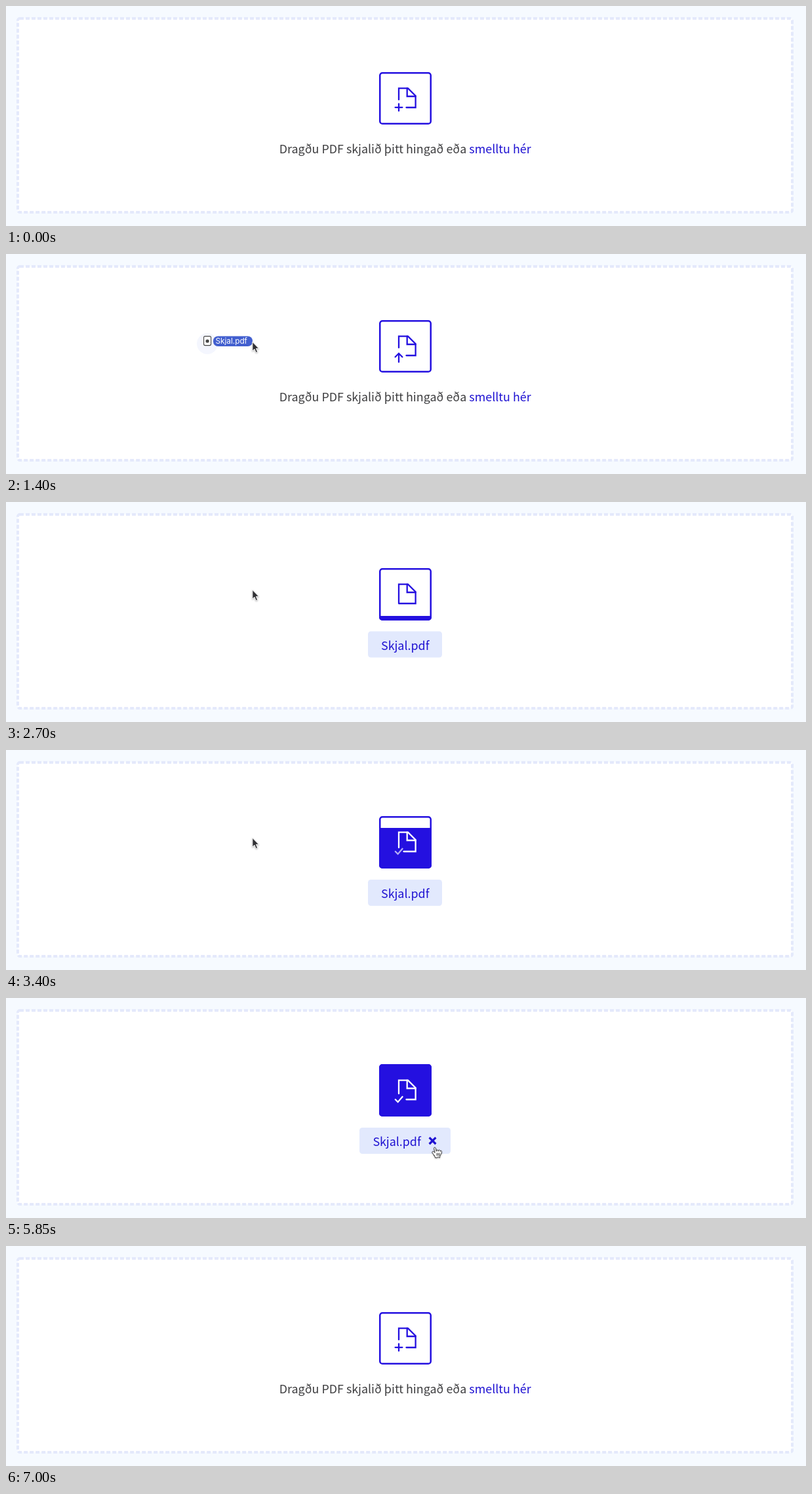
Animation of 1220x336 px, one loop 7.7 s. Source, as an HTML page:

```html
<!DOCTYPE html>
<html lang="is">
<head>
<meta charset="utf-8">
<title>PDF</title>
<style>
html, body { margin: 0; width: 1220px; height: 336px; overflow: hidden; background: #f6faff; }
svg { display: block; color: #2410e0; }
.copy { font: 17.9px "Noto Sans CJK JP", "Noto Sans CJK SC", "Noto Sans CJK", "Noto Sans", sans-serif; text-anchor: middle; }
.line { fill: none; stroke: currentColor; stroke-width: 2.3; stroke-linecap: round; }
.cursor { filter: drop-shadow(0 1px 1px rgba(0, 0, 0, .3)); }
</style>
</head>
<body>
<svg width="1220" height="336" viewBox="0 0 1220 336">
  <defs>
    <clipPath id="level"><rect id="levelRect" x="569" width="80" height="80"/></clipPath>
    <g id="icon" class="line">
      <path id="sheet"/>
      <path d="M611.7 125.6V138H624.6"/>
      <path id="plus" d="M593.6 154.8H604.4M599 149.4V160.2"/>
      <path id="arrow" d="M599 152V165M593.6 157.2L599 151.8L604.4 157.2"/>
      <path id="check" d="M593.8 155L597.6 158.9L604.6 150.8"/>
    </g>
  </defs>

  <rect x="18" y="19" width="1181" height="296" rx="3" fill="#fff"/>
  <rect x="18" y="19" width="1181" height="296" rx="3" fill="none" stroke="#e4e9fb" stroke-width="4" stroke-dasharray="6 3"/>

  <rect x="570.25" y="102.25" width="77.5" height="77.5" rx="3.8" fill="#fff" stroke="#2410e0" stroke-width="2.5"/>
  <use href="#icon"/>
  <g id="fill" clip-path="url(#level)">
    <rect x="569" y="101" width="80" height="80" rx="5" fill="#2410e0"/>
    <use href="#icon" color="#fff"/>
  </g>

  <text id="prompt" class="copy" x="608.7" y="225" fill="#3d3d3f">Dragðu PDF skjalið þitt hingað eða <tspan fill="#1f12d2">smelltu hér</tspan></text>

  <g id="pill">
    <rect id="pillBox" y="198" height="40" rx="4.5" fill="#e2e9fd"/>
    <text id="pillText" class="copy" y="226" fill="#1f12d2">Skjal.pdf</text>
    <path id="cross" d="M645.6 213.2L655.4 223M655.4 213.2L645.6 223" stroke="#1f12d2" stroke-width="3.2"/>
  </g>

  <g id="ghost">
    <circle cx="307" cy="137" r="16" fill="#f4f6fe"/>
    <rect x="301.6" y="125.6" width="11" height="14" rx="2" fill="#fff" stroke="#444" stroke-width="1.1"/>
    <circle cx="307.1" cy="133" r="2.6" fill="#444"/>
    <rect x="316" y="125.5" width="60" height="15.5" rx="7.2" fill="#425fcf"/>
    <text x="319.4" y="137.4" fill="#fff" style="font:11.8px Inter,sans-serif">Skjal.pdf</text>
  </g>
  <path id="pointer" class="cursor" d="M375.8 134.2V148.2L378.9 145.2L381.2 150.6L383.7 149.5L381.4 144.3H385.6Z" fill="#303034" stroke="#fff" stroke-width="1"/>
  <g id="hand" class="cursor" stroke="#222" stroke-width=".9" stroke-linejoin="round" stroke-linecap="round">
    <path fill="#fff" d="M11.3 20.4C10.6 19.2 9.2 17.3 8.6 16.5C8 15.2 9.2 14.2 10.2 14.5C11.2 14.8 11.9 15.9 12.6 16.6C12.4 14.6 11.8 13 11.3 10.7C11 9.3 11.2 8.4 12.2 8.4C13.2 8.4 13.6 9.2 13.9 10.1C14.3 11.4 14.5 12.9 14.8 14.4C14.6 12.8 15 12.2 15.9 12.2C17.1 12.1 17.5 13.1 17.6 14.4C17.7 13 18 12.4 19.1 12.3C20.3 12.3 20.6 13.3 20.7 14.6C20.9 13.6 21.5 13.3 22 13.4C22.9 13.6 22.9 14.6 22.9 15.5C22.9 18 21.3 19.4 20.4 21C19.9 22 20 22.7 20.1 23.9C18.7 24.2 18.4 23.8 18 23C17.6 22.4 17.6 22.5 17.2 23C16.7 24 16.3 24.1 15.5 24.1H13C13.1 22.5 12 22 11.3 20.4Z"/>
    <path fill="none" d="M15.6 17.3V20.7M17.6 17.3V20.7M19.6 17.3V20.7"/>
  </g>
</svg>
<script>
const LOOP = 7700, STEP = 50;
const el = id => document.getElementById(id);
const set = (id, attrs) => { for (const k in attrs) el(id).setAttribute(k, attrs[k]); };
const shift = (x, y) => `translate(${x} ${y})`;
const ramp = (t, from, to) => Math.min(1, Math.max(0, (t - from) / (to - from)));
const smooth = (t, from, to) => { const p = ramp(t, from, to); return p * p * (3 - 2 * p); };
const easeOut = (t, from, to) => 1 - (1 - ramp(t, from, to)) ** 2;
const mix = (a, b, p) => a + (b - a) * p;
const shown = on => on ? 1 : 0;

function drawIcon(t) {
  const hovering = smooth(t, 100, 300), dropped = smooth(t, 2450, 2650);
  const checked = smooth(t, 3200, 3530), reset = smooth(t, 5950, 6250);
  // The sheet's lower left corner opens to make room for the badge.
  const open = 1 - dropped + checked;
  const reach = mix(mix(12, 9, dropped), 12, reset);
  set('sheet', { d: `M599 ${155 - reach * open}V125.6H613L624.6 137.2V155H${599 + 11.5 * open}` });
  set('plus', { opacity: 1 - hovering + reset });
  set('arrow', {
    opacity: hovering * (1 - dropped),
    transform: shift(0, 1 - Math.cos((t - 400) * Math.PI / 500))
  });
  set('check', { opacity: checked * (1 - reset) });
  set('levelRect', { y: 181 - 80 * ramp(t, 2611, 3629) });
  set('fill', { opacity: 1 - smooth(t, 5900, 6200) });
}

function drawLabels(t) {
  const enter = easeOut(t, 2450, 2780), leave = smooth(t, 5900, 6100);
  const wide = smooth(t, 5250, 5500);
  set('prompt', { opacity: 1 - ramp(t, 2450, 2600) + smooth(t, 6050, 6350) });
  set('pill', { opacity: ramp(t, 2480, 2680) * (1 - leave), transform: shift(0, -8 * (1 - enter)) });
  set('pillBox', { x: 552 - 13 * wide, width: 113 + 26 * wide });
  set('pillText', { x: 608.8 - 12.7 * wide });
  set('cross', { opacity: ramp(wide, 0.5, 1) });
}

function drawCursor(t) {
  const away = 1 - easeOut(t, 50, 750);
  const entry = shift(-276 * away, -84 * away);
  set('ghost', { opacity: shown(t >= 50 && t < 2450), transform: entry });
  set('pointer', { opacity: shown(t >= 50 && t < 4800), transform: entry });

  const go = smooth(t, 4800, 5450), exit = ramp(t, 6600, 6950) ** 2;
  const overshoot = 4 * Math.sin(Math.PI * ramp(t, 5300, 5550));
  set('hand', {
    opacity: shown(t >= 4800 && t < 7000),
    transform: shift(373.5 + 268 * go, 127.8 + 92 * go + overshoot + 115 * exit)
  });
}

function render(time) {
  const t = Math.floor(time % LOOP / STEP) * STEP;
  drawIcon(t);
  drawLabels(t);
  drawCursor(t);
}

function tick(now) {
  render(now);
  requestAnimationFrame(tick);
}
render(0);
requestAnimationFrame(tick);
</script>
</body>
</html>
```
